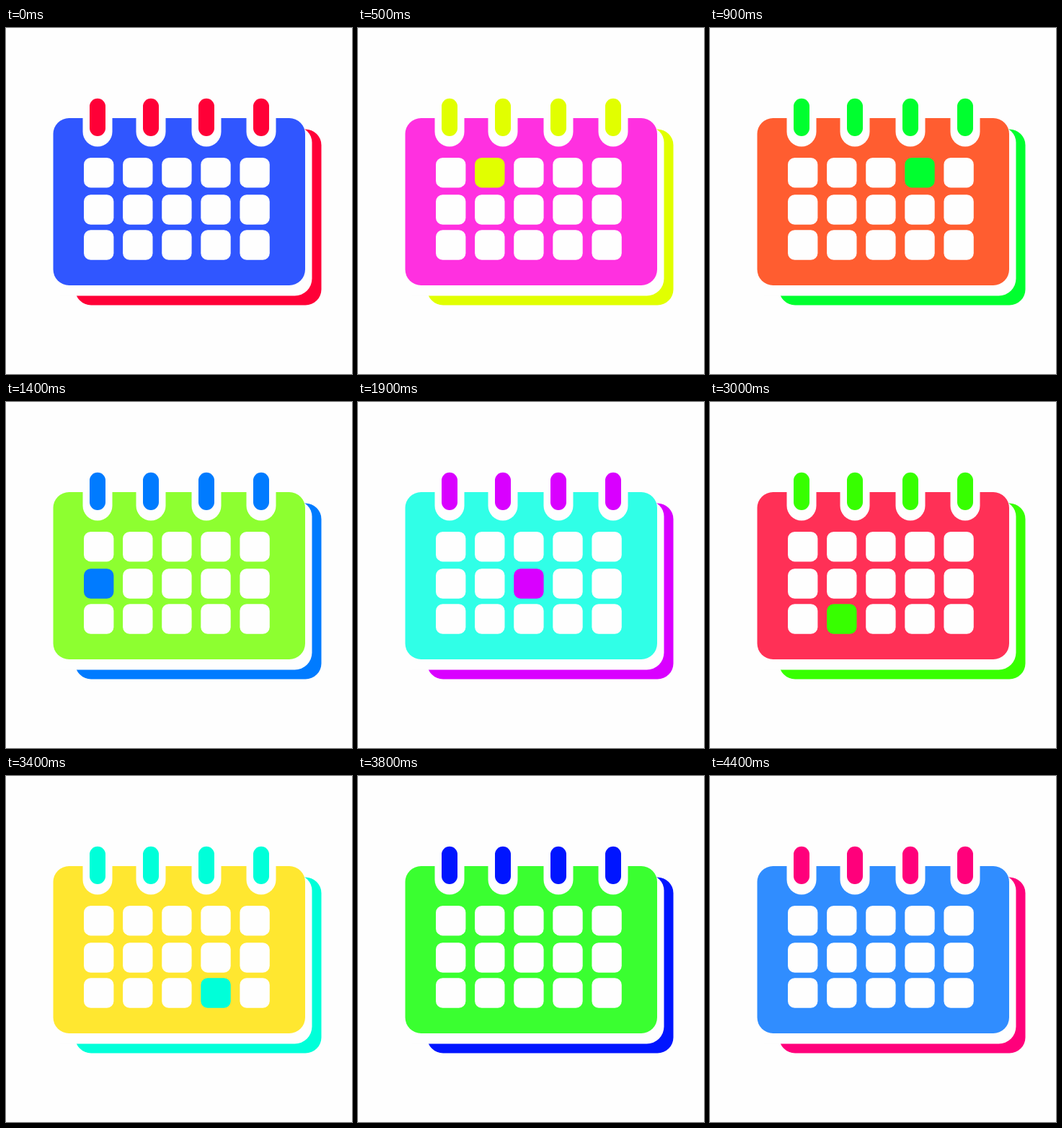
Animation of 480 by 480 pixels, one loop 4.5 s. Source, as an HTML page with a canvas:

```html
<!DOCTYPE html>
<html lang="en">
<head>
<meta charset="utf-8">
<title>Calendar</title>
<style>
  html, body { margin: 0; width: 100%; height: 100%; overflow: hidden; background: #fefefe; }
  canvas { display: block; width: 480px; height: 480px; }
</style>
</head>
<body>
<canvas id="stage" width="480" height="480"></canvas>
<script>
const ctx = document.getElementById('stage').getContext('2d');
const LOOP = 4500, TICK = 100;
const PAPER = '#fefefe';
const RINGS = [127, 201, 278, 354];
const COLS = 5, CELLS = 15;
const ROW_Y = [180, 231.3, 280.3];
const CELL_START = 95, CELL_TIME = 245;

function box(x, y, w, h, r, color) {
  ctx.fillStyle = color;
  ctx.beginPath();
  ctx.roundRect(x, y, w, h, r);
  ctx.fill();
}

function draw(t) {
  // Both hues make two full turns per loop.
  const turn = t / LOOP * 720;
  const main = `hsl(${(229 + turn) % 360}, 100%, 59.4%)`;
  const accent = `hsl(${(347 + turn) % 360}, 100%, 50%)`;
  const active = Math.floor((t - CELL_START) / CELL_TIME);

  ctx.fillStyle = PAPER;
  ctx.fillRect(0, 0, 480, 480);

  // Back page, gap and front page
  box(96, 140.5, 341.5, 244, 22, accent);
  box(75, 137, 349.5, 234.5, [0, 22, 24, 0], PAPER);
  box(65.5, 125, 349.5, 232, 22, main);

  for (const x of RINGS) {
    box(x - 20.5, 100, 41, 64.5, 20.5, PAPER);
    box(x - 11, 97.7, 22, 52.3, 11, accent);
  }

  for (let i = 0; i < CELLS; i++) {
    const x = 108 + 54.1 * (i % COLS);
    const y = ROW_Y[Math.floor(i / COLS)];
    box(x, y, 41.4, 41.4, 9.5, i === active ? accent : PAPER);
  }
}

const start = performance.now();
function frame() {
  const t = (performance.now() - start) % LOOP;
  draw(Math.floor(t / TICK) * TICK);
  requestAnimationFrame(frame);
}
frame();
</script>
</body>
</html>
```
